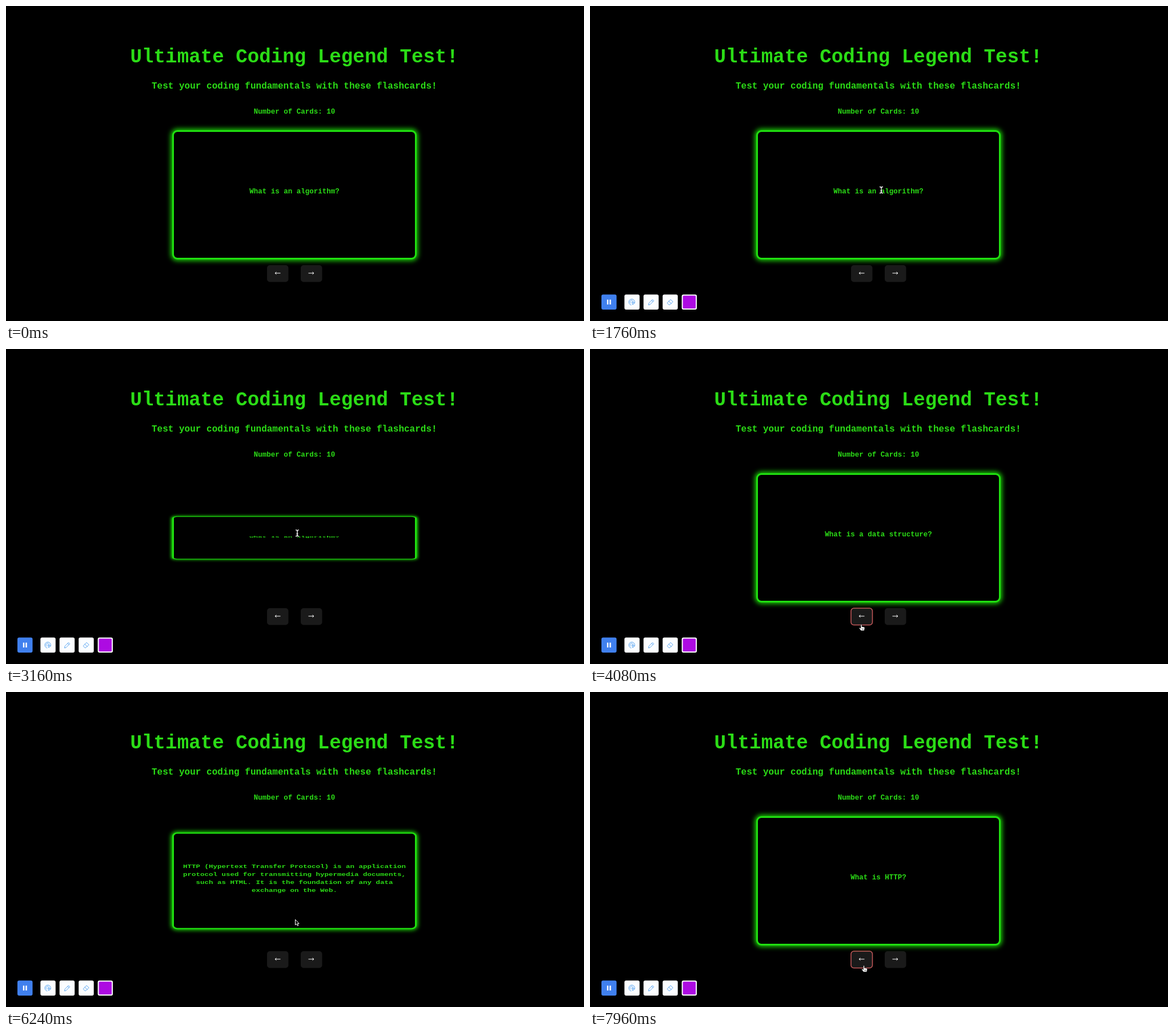
Recreate the animation shown at these times as an HTML page. Size 1012 by 553 pixels, loop 8000 ms.

```html
<!DOCTYPE html>
<html lang="en">
<head>
<meta charset="utf-8">
<title>Flashcards</title>
<style>
  html, body { margin: 0; width: 100%; height: 100%; overflow: hidden; background: #000; }
  #stage {
    position: relative; width: 1012px; height: 553px; overflow: hidden; background: #000;
    font: bold 12.5px "Liberation Mono", "Courier New", monospace; color: #2bdc16;
  }
  svg { position: absolute; left: 0; top: 0; }
  .head { fill: #2bdc16; text-anchor: middle; }
  #card {
    position: absolute; left: 291px; top: 218px; width: 428px; height: 227px;
    box-sizing: border-box; padding-bottom: 10px;
    border: 3px solid #20e010; border-radius: 9px; background: #000;
    box-shadow: 0 0 9px 2px #1cdc08;
    display: flex; align-items: center; justify-content: center;
    text-align: center; white-space: pre; line-height: 18.8px;
  }
  .btn rect { fill: #1a1a1a; stroke: #c4585a; stroke-width: 1.5; }
  .btn path { fill: none; stroke: #fff; stroke-width: 1; }
  .icon { fill: none; stroke: #5fa8f2; stroke-width: 1; stroke-linejoin: round; stroke-linecap: round; }
</style>
</head>
<body>
<div id="stage">
  <svg width="1012" height="553">
    <g class="head">
      <text x="504.8" y="99" font-size="34.2">Ultimate Coding Legend Test!</text>
      <text x="504.8" y="145" font-size="16.03">Test your coding fundamentals with these flashcards!</text>
      <text x="505" y="189" font-size="12.5">Number of Cards: 10</text>
    </g>
    <g class="btn" transform="translate(475.5 469.5)">
      <rect id="prev" x="-18.5" y="-14.5" width="37.5" height="29.5" rx="5" stroke-opacity="0"/>
      <path d="M5-.5H-4M-2-2.5L-4.5-.5L-2 1.5"/>
    </g>
    <g class="btn" transform="translate(534.5 469.5)">
      <rect x="-18.5" y="-14.5" width="37.5" height="29.5" rx="5" stroke-opacity="0"/>
      <path d="M-5-.5H4M2-2.5L4.5-.5L2 1.5"/>
    </g>
  </svg>

  <div id="card"></div>

  <svg width="1012" height="553">
    <g id="tools" opacity="0">
      <rect x="20" y="506.5" width="26.5" height="26.5" rx="3" fill="#4080ee"/>
      <path d="M31 515.5v8.5M35.5 515.5v8.5" stroke="#fff" stroke-width="2.4"/>
      <g fill="#fbfdff">
        <rect x="60.3" y="506.5" width="26.5" height="26.5" rx="3"/>
        <rect x="93.7" y="506.5" width="26.5" height="26.5" rx="3"/>
        <rect x="127.2" y="506.5" width="26.5" height="26.5" rx="3"/>
        <rect x="160.6" y="506.5" width="26.5" height="26.5" rx="3"/>
      </g>
      <rect x="162.6" y="508.5" width="22.5" height="22.5" rx="1.5" fill="#ad0be2"/>
      <g class="icon">
        <path d="M72 525a5.3 5.3 0 1 1 6-3M71 522a3 3 0 1 1 4.8-2"/>
        <path d="M73.5 519.5l4.5 1.8-2 .8-.8 2z"/>
        <path d="M102.5 524.5l.7-3 6.3-6.3 2.3 2.3-6.3 6.3zM108 516.7l2.3 2.3"/>
        <path d="M135.5 521l5.5-5.8 4.2 4-5.3 5.3h-1.6zM138 518.3l4.2 4"/>
      </g>
    </g>

    <g id="arrow" stroke="#fff" stroke-width="1" fill="#000">
      <path d="M0 0V9.5L2.2 7.5L3.9 11L5.4 10.3L3.8 7H6.6Z"/>
    </g>
    <g id="beam" fill="none">
      <path d="M-3-5.5Q0-5.5 0-3.5V3.5Q0 5.5-3 5.5M3-5.5Q0-5.5 0-3.5M3 5.5Q0 5.5 0 3.5M-1.5 1.5H1.5" stroke="#000" stroke-width="3"/>
      <path d="M-3-5.5Q0-5.5 0-3.5V3.5Q0 5.5-3 5.5M3-5.5Q0-5.5 0-3.5M3 5.5Q0 5.5 0 3.5M-1.5 1.5H1.5" stroke="#fff" stroke-width="1.4"/>
    </g>
    <g id="hand" fill="#fff" stroke="#000" stroke-width=".6">
      <path d="M-1 1Q0-.5 1 1V4.5L4.5 5Q6 5.2 6 7L5 11.5H-.5L-3.8 7.3Q-3.5 5.8-2 6.6L-1 7.5Z"/>
      <path d="M1.5 7.5V10M3.3 7.5V10"/>
    </g>
  </svg>
</div>

<script>
const LOOP = 8000, FLIP = 600;
const $ = id => document.getElementById(id);
const clamp = v => Math.min(1, Math.max(0, v));

const cards = [
  { from: 0, q: "What is an algorithm?",
    a: "An algorithm is a step-by-step procedure for solving\na problem or accomplishing a task. It's a sequence of\nwell-defined instructions." },
  { from: 3900, q: "What is a data structure?", a: "" },
  { from: 4500, q: "What is HTTP?",
    a: "HTTP (Hypertext Transfer Protocol) is an application\nprotocol used for transmitting hypermedia documents,\nsuch as HTML. It is the foundation of any data\nexchange on the Web." }
];
const flips = [2000, 2950, 5960, 6953];

// Pointer hotspot: time, x, y
const path = [
  [240, 824, 262], [960, 510, 323], [3150, 510, 323], [3750, 475, 483],
  [4650, 475, 483], [5350, 506.5, 399.5], [7150, 506.5, 399.5], [7820, 479.5, 480]
];

// cubic-bezier(.25, .1, .25, 1)
function ease(x) {
  let lo = 0, hi = 1, s = x;
  for (let i = 0; i < 20; i++) {
    s = (lo + hi) / 2;
    const bx = .75 * s * (1 - s) + s * s * s;
    if (bx < x) lo = s; else hi = s;
  }
  return .3 * s * (1 - s) * (1 - s) + 3 * s * s * (1 - s) + s * s * s;
}

function pointer(t) {
  let i = 0;
  while (i < path.length - 1 && path[i + 1][0] <= t) i++;
  const a = path[i], b = path[i + 1] || a;
  const k = a === b ? 0 : clamp((t - a[0]) / (b[0] - a[0]));
  const s = k * k * (3 - 2 * k);
  return [a[1] + (b[1] - a[1]) * s, a[2] + (b[2] - a[2]) * s];
}

const onPrev = ([x, y]) => x > 457 && x < 494 && y > 455 && y < 485;
const onText = ([x, y]) => Math.abs(x - 505) < 80 && Math.abs(y - 325) < 10;

function drawCard(t) {
  const turns = flips.reduce((n, f) => n + ease(clamp((t - f) / FLIP)), 0);
  const card = cards.filter(c => c.from <= t).pop();
  const text = Math.round(turns) % 2 ? card.a : card.q;
  const el = $("card");
  if (el.textContent !== text) el.textContent = text;
  el.style.transform = `scaleY(${Math.abs(Math.cos(turns * Math.PI))})`;
}

function drawPointer(t) {
  const p = pointer(t);
  const kind = t < path[0][0] ? "" : onPrev(p) ? "hand" : onText(p) ? "beam" : "arrow";
  for (const id of ["arrow", "beam", "hand"]) {
    $(id).setAttribute("transform", `translate(${p[0]} ${p[1]})`);
    $(id).setAttribute("visibility", id === kind ? "visible" : "hidden");
  }
  // Hover border fades over 250 ms
  let glow = 0;
  for (let d = 0; d < 10; d++) glow += onPrev(pointer(Math.max(0, t - d * 25))) / 10;
  $("prev").setAttribute("stroke-opacity", glow);
}

const start = performance.now();
function run() {
  const t = (performance.now() - start) % LOOP;
  drawCard(t);
  drawPointer(t);
  $("tools").setAttribute("opacity", clamp((t - 280) / 200));
  requestAnimationFrame(run);
}
run();
</script>
</body>
</html>
```
